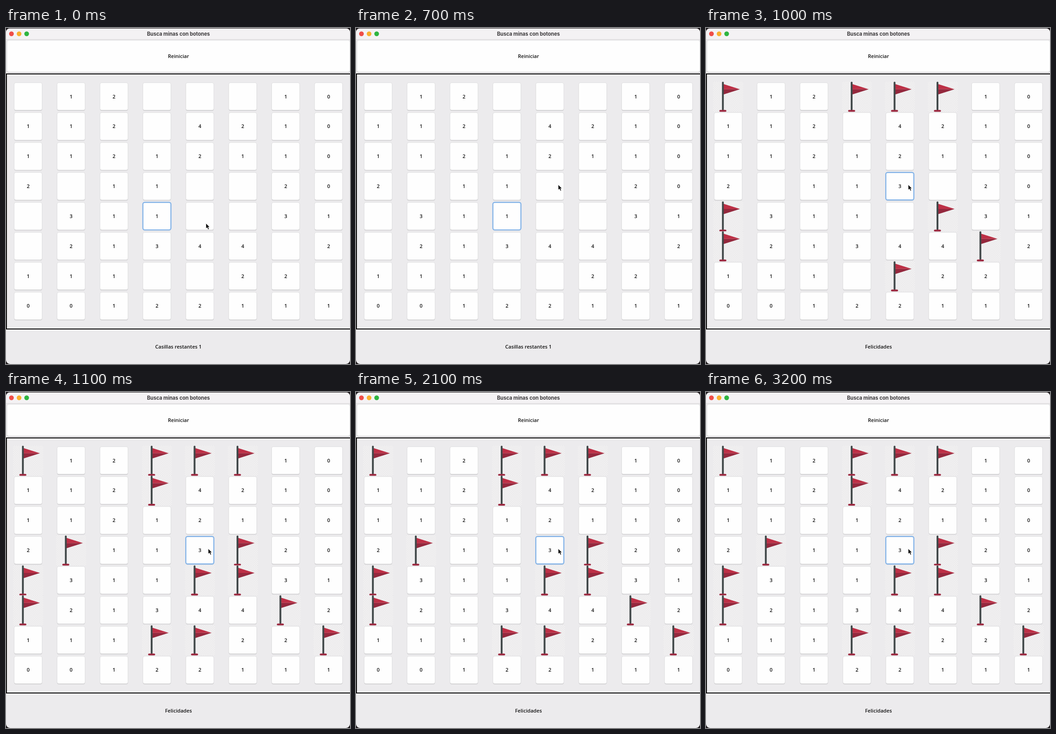
Recreate the animation shown at these times as an HTML page. Size 758 by 739 pixels, loop 3700 ms.

```html
<!DOCTYPE html>
<html lang="es">
<head>
<meta charset="utf-8">
<title>Busca minas con botones</title>
<style>
  html, body { margin: 0; width: 100%; height: 100%; overflow: hidden; background: #1d191c; }
  svg { display: block; }
  text { font: 600 11.1px "Open Sans", "Noto Sans", sans-serif; text-anchor: middle; fill: #111; }
  .title { font: 700 11.1px Inter, sans-serif; fill: #3b393b; }
  .shadow { fill: #c5c4c6; }
  .face { fill: #fefefe; stroke: #d9d8da; stroke-width: .8; }
  .ring { fill: none; stroke: #84b4e8; stroke-width: 2.4; }
</style>
</head>
<body>
<svg width="758" height="739" viewBox="0 0 758 739">
  <defs>
    <pattern id="checker" width="4" height="4" patternUnits="userSpaceOnUse">
      <path d="M0 0H4V4H0Z" fill="#f8f7f8"/>
      <path d="M0 0H2V2H0ZM2 2H4V4H2Z" fill="#e5e4e5"/>
    </pattern>
    <g id="flag">
      <path d="M-2 -2H64V64H-2Z" fill="url(#checker)"/>
      <path d="M20.5 3L57 14.5H20.5Z" fill="#bd3046"/>
      <path d="M20.5 14.5H57L20.5 26Z" fill="#94283d"/>
      <rect x="17.3" y="-2" width="4" height="63" rx="1.5" fill="#414849"/>
      <rect x="11.5" y="60" width="15.5" height="4" rx="2" fill="#9c2940"/>
    </g>
  </defs>
  <rect y="1" width="758" height="738" rx="9" fill="#ecebed"/>
  <path d="M0 25V10Q0 1 9 1H749Q758 1 758 10V25Z" fill="#f4f2f4"/>
  <path d="M0 25.2H758" stroke="#d8d6d8"/>
  <circle cx="12" cy="12.8" r="5.2" fill="#ee4e49"/>
  <circle cx="28.8" cy="12.8" r="5.2" fill="#f9b02d"/>
  <circle cx="45.5" cy="12.8" r="5.2" fill="#2fb541"/>
  <text class="title" x="380" y="16.5">Busca minas con botones</text>
  <rect class="shadow" x="2" y="28" width="756" height="70.2" rx="4"/>
  <rect class="face" x="2" y="27" width="756" height="70" rx="4"/>
  <text x="380" y="66">Reiniciar</text>
  <path d="M760 101H1V662H760" fill="none" stroke="#080808" stroke-width="2"/>
  <g id="board"></g>
  <text id="status" x="380" y="705.3"></text>
  <circle id="click" cx="445.5" cy="346" r="16.8" fill="none" stroke="#0a0a0a" stroke-width="2.6"/>
  <path id="cursor" d="M0 0V11.6L2.7 9.2L4.6 13.6L6.9 12.6L5 8.4H8.4Z" fill="#090909" stroke="#fff" stroke-width=".8"/>
</svg>
<script>
// '*' mines are flagged first, '+' mines one step later.
const rows = ["*12***10", "112+4210", "11212110", "2+113+20",
              "*311+*31", "*21344*2", "111+*22+", "00122111"];
const LOOP = 3700, PRESS = 900, WIN = 1000, LATE = 1100;
const $ = id => document.getElementById(id);
const board = $("board");

function add(parent, tag, attrs, text = "") {
  const el = document.createElementNS("http://www.w3.org/2000/svg", tag);
  for (const key in attrs) el.setAttribute(key, attrs[key]);
  el.textContent = text;
  parent.append(el);
  return el;
}

const show = (el, on) => el.setAttribute("visibility", on ? "visible" : "hidden");
const cellX = col => 17.9 + 94.57 * col;
const cellY = row => 120.2 + 65.83 * row;
const box = { width: 61.8, height: 60.6, rx: 4 };
const flags = [];
let lastFace, lastDigit;

rows.forEach((line, row) => [...line].forEach((mark, col) => {
  const x = cellX(col), y = cellY(row);
  add(board, "rect", { ...box, class: "shadow", x, y: y + 1.1 });
  const face = add(board, "rect", { ...box, class: "face", x, y });
  const mine = "*+".includes(mark);
  const digit = add(board, "text", { x: x + 31, y: y + 34.4 }, mine ? "" : mark);
  if (row === 3 && col === 4) [lastFace, lastDigit] = [face, digit];
  if (mine) flags.push([x, y, mark === "*" ? WIN : LATE]);
}));

const flagItems = flags.map(([x, y, start]) =>
  ({ el: add(board, "use", { href: "#flag", x, y }), start }));
const ring = add(board, "rect", { ...box, class: "ring" });

function draw(t) {
  const pressed = t >= PRESS && t < WIN, won = t >= WIN;
  for (const { el, start } of flagItems) show(el, t >= start);
  show(lastDigit, won);
  show($("click"), pressed);
  lastFace.style.fill = pressed ? "#eeedef" : "";
  ring.setAttribute("x", cellX(t < PRESS ? 3 : 4));
  ring.setAttribute("y", cellY(t < PRESS ? 4 : 3));
  $("status").textContent = won ? "Felicidades" : "Casillas restantes 1";
  const [x, y] = t < 100 ? [440.6, 429.6] : t < 200 ? [444, 378] : [445.6, 344.6];
  $("cursor").setAttribute("transform", `translate(${x} ${y})`);
}

function tick() {
  draw(performance.now() % LOOP);
  requestAnimationFrame(tick);
}
tick();
</script>
</body>
</html>
```
